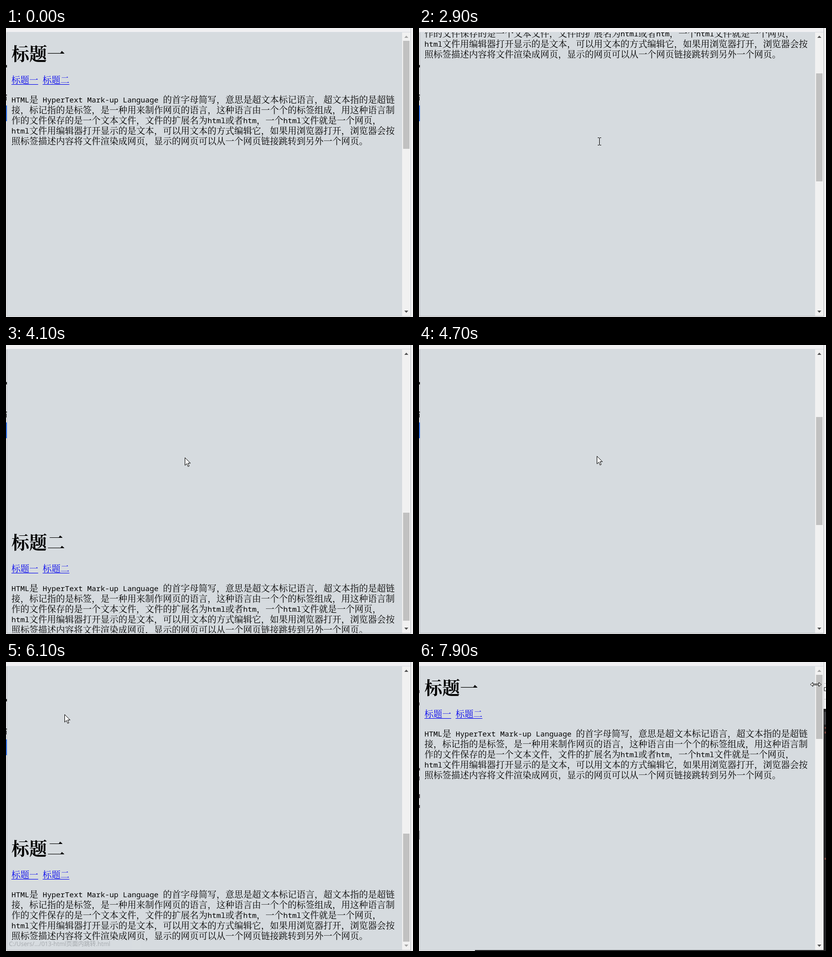
An HTML page for the animation above (8 s loop, 822 px wide and 586 px high).

```html
<!DOCTYPE html>
<html lang="zh-CN">
<head>
<meta charset="utf-8">
<title>页面内跳转</title>
<style>
  html, body { margin: 0; width: 100%; height: 100%; overflow: hidden; background: #f3f3f4; }
  svg { display: block; }
  text { white-space: pre; text-spacing-trim: space-all; }
  .cjk { font: 300 18px "Noto Serif CJK SC", "Noto Sans CJK SC", "Noto Sans CJK", serif; }
  .latin { font: 300 15px "Noto Sans Mono", "Liberation Mono", monospace; }
  .title { font: 700 36px "Noto Serif CJK SC", "Noto Sans CJK SC", "Noto Sans CJK", serif; }
  .link { fill: #00e; }
  .status { font: 12px "Open Sans", "Noto Sans CJK SC", sans-serif; fill: #5f6368; }
  .cursor path { stroke: #000; fill: #fff; }
  #beam path { fill: none; }
</style>
</head>
<body>
<svg width="822" height="586" viewBox="0 0 822 586">
  <defs><clipPath id="view"><rect x="2" y="9" width="798" height="575"/></clipPath></defs>
  <rect width="822" height="586" fill="#f3f3f4"/>
  <rect x="1" width="817" height="9" fill="#f0f0f2"/>
  <rect x="1" y="8" width="816" height="1" fill="#d8dce2"/>
  <rect x="2" y="9" width="798" height="575" fill="#d6dbdf"/>
  <g clip-path="url(#view)"><g id="page"></g></g>
  <g id="status">
    <rect x="2" y="564" width="270" height="20" fill="#dadee2"/>
    <text class="status" x="6" y="576">C:/Users/.../013-html页面内跳转.html</text>
  </g>
  <rect x="800" y="9" width="17" height="575" fill="#f1f1f1"/>
  <rect id="thumb" x="802" width="13" fill="#c1c1c1"/>
  <path id="up" d="M804.500 20h8l-4-4.500z"/>
  <path id="down" d="M804.500 573h8l-4 4.500z"/>
  <path id="frame" d="M1.500 9V584.500H817.500V0" fill="none"/>
  <g id="desk">
    <path d="M0 75h2v5h-2zM0 135h2v2h-2zM0 139h1v8h-1z" fill="#222"/>
    <path d="M0 157h2v32h-2z" fill="#2f6fe4"/>
  </g>
  <g id="editor">
    <path d="M817 95h5v491h-5zM113 584h709v2h-709z" fill="#242425"/>
    <path d="M818 43h4v1h-4zM818 75h4v1h-4z" fill="#c4c4c4"/>
    <path d="M822 51.500h-3.500v7h3.500" fill="none" stroke="#222"/>
    <path d="M818 101h4v26h-4z" fill="#454548"/>
    <path d="M819 132h3v3h-3zM819 141h3v4h-3zM819 397h3v4h-3z" fill="#74433f"/>
    <path d="M0 57h1v6h-1zM0 82h1v6h-1zM0 215h2v5h-2zM0 232h1v8h-1zM0 268h2v8h-2zM0 290h2v6h-2z" fill="#554a50"/>
    <path d="M0 342h2v18h-2z" fill="#a3a3a8"/>
  </g>
  <g id="beam" class="cursor"><path d="M-1-7.500h3m1 0h3M2.500-7v14M-1 7.500h3m1 0h3"/></g>
  <g id="arrow" class="cursor"><path d="M.5.500v15.500l3.600-3.400 2.500 5.800 2.400-1-2.500-5.800h4.900z"/></g>
  <g id="hand" class="cursor"><path d="M-1.500 11V1.500q1.500-2 3 0V7l7 1.500q2 .500 2 3v3l-2 5.500h-8l-5.500-8q1-2 3.500 0z"/></g>
  <g id="resize" class="cursor"><path d="M.5 4.500l5-4v3h12v-3l5 4-5 4v-3h-12v3z"/></g>
</svg>
<script>
const LOOP = 8000, STEP = 100, MAX_SCROLL = 853, TRACK = 541;
const JUMP = 5900, RELOAD = 7500;
const $ = id => document.getElementById(id);
const page = $('page');

const LINES = [
  'HTML是 HyperText Mark-up Language 的首字母简写，意思是超文本标记语言，超文本指的是超链',
  '接，标记指的是标签，是一种用来制作网页的语言，这种语言由一个个的标签组成，用这种语言制',
  '作的文件保存的是一个文本文件，文件的扩展名为html或者htm，一个html文件就是一个网页，',
  'html文件用编辑器打开显示的是文本，可以用文本的方式编辑它，如果用浏览器打开，浏览器会按',
  '照标签描述内容将文件渲染成网页，显示的网页可以从一个网页链接跳转到另外一个网页。'
];

function add(tag, attrs, parent, content = '') {
  const el = document.createElementNS('http://www.w3.org/2000/svg', tag);
  for (const key in attrs) el.setAttribute(key, attrs[key]);
  el.textContent = content;
  return parent.appendChild(el);
}

// Latin takes a half-width cell, Chinese a full one.
function addLine(str, y, parent) {
  let x = 11;
  for (const run of str.match(/[ -~]+|[^ -~]+/g)) {
    const latin = /^[ -~]/.test(run);
    add('text', { class: latin ? 'latin' : 'cjk', x, y: latin ? y - 1 : y }, parent, run);
    x += run.length * (latin ? 9 : 18);
  }
}

function addSection(title, top) {
  const g = add('g', { transform: `translate(0 ${top})` }, page);
  add('text', { class: 'title', x: 11, y: 66 }, g, title);
  ['标题一', '标题二'].forEach((label, i) => {
    const x = 11 + i * 63;
    add('text', { class: 'cjk link', x, y: 112 }, g, label);
    add('rect', { class: 'link', x, y: 114, width: 54, height: 1 }, g);
  });
  LINES.forEach((line, i) => addLine(line, 152 + i * 21, g));
}
addSection('标题一', 0);
addSection('标题二', MAX_SCROLL + 326);

const progress = (t, from, to) => Math.min(1, Math.max(0, (t - from) / (to - from)));
const smooth = k => k * k * k * (10 - 15 * k + 6 * k * k);

// Two wheel turns down, one accelerating run back up, then the jump by link.
function scrollAt(t) {
  if (t >= JUMP) return t < RELOAD ? MAX_SCROLL : 0;
  const down = 808 * smooth(progress(t, 2593, 3500)) + 45 * smooth(progress(t, 3500, 3800));
  const up = MAX_SCROLL * progress(t, 4000, 4930) ** 1.645;
  return Math.round(down - up);
}

// Pointer moves: start, end, x, y
const MOVES = [
  [500, 900, 185, 200], [900, 1200, 358, 214], [1300, 1600, 358, 224], [2000, 2100, 362, 230],
  [4000, 4300, 359, 225], [5000, 5800, 118, 106], [6400, 6800, 510, 179],
  [6800, 7200, 808, 36], [7800, 7900, 790, 41]
];

function pointerAt(t) {
  let x = 670, y = 104;
  for (const [from, to, toX, toY] of MOVES) {
    const k = progress(t, from, to);
    x += (toX - x) * k;
    y += (toY - y) * k;
  }
  return [Math.round(x), Math.round(y)];
}

function cursorAt(t, x, y, scroll) {
  if (t < 500) return '';
  if (t >= RELOAD) return t < 7900 ? '' : 'resize';
  if (t < 3400) return 'beam';
  if (scroll > 0) return 'arrow';
  if (x < 128 && y < 117) return 'hand';
  return y > 134 && y < 240 ? 'beam' : 'arrow';
}

function render(t) {
  const reloaded = t >= RELOAD;
  const scroll = scrollAt(t);
  const size = reloaded ? 130 : 219;
  page.setAttribute('transform', `translate(0 ${-scroll})`);
  $('thumb').setAttribute('y', 26 + Math.round(scroll / MAX_SCROLL * (TRACK - size)));
  $('thumb').setAttribute('height', size);
  $('up').setAttribute('fill', scroll > 0 ? '#505050' : '#a3a3a3');
  $('down').setAttribute('fill', scroll < MAX_SCROLL ? '#505050' : '#a3a3a3');
  $('frame').setAttribute('stroke', t >= 2400 && !reloaded ? '#b2b4b7' : '#c6c8cb');
  $('status').setAttribute('opacity', t < JUMP ? 0 : 0.9 * progress(t, 6200, 5980));
  $('desk').style.display = reloaded ? 'none' : '';
  $('editor').style.display = reloaded ? '' : 'none';

  const [x, y] = pointerAt(t);
  const shape = cursorAt(t, x, y, scroll);
  for (const id of ['beam', 'arrow', 'hand', 'resize']) {
    $(id).style.display = id === shape ? '' : 'none';
    $(id).setAttribute('transform', `translate(${x} ${y})`);
  }
}

const start = performance.now();
function tick() {
  const t = (performance.now() - start) % LOOP;
  render(Math.floor(t / STEP) * STEP);
  requestAnimationFrame(tick);
}
tick();
</script>
</body>
</html>
```
